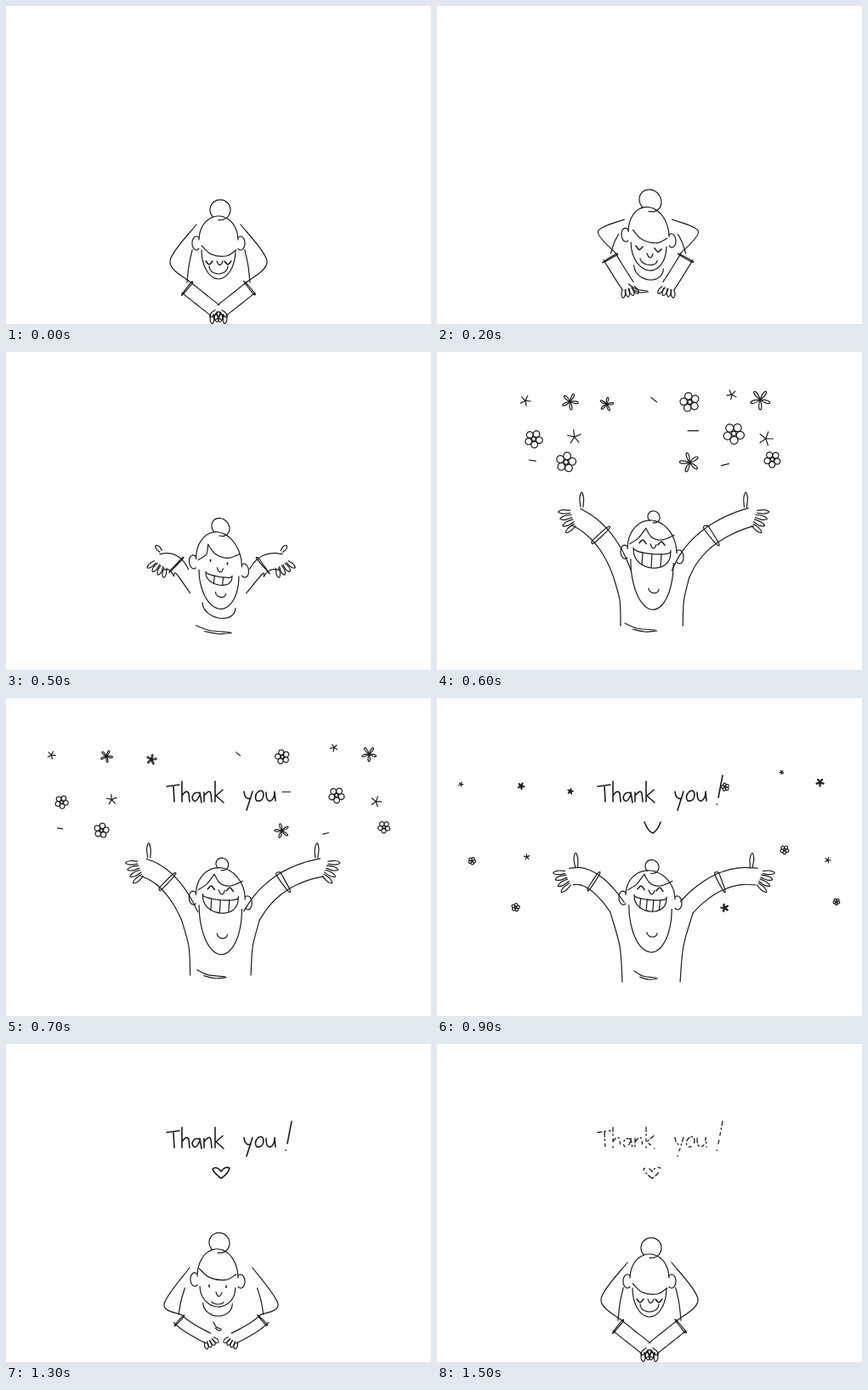
An HTML page for the animation above (1.6 s loop, 500 by 374 pixels).

```html
<!DOCTYPE html>
<html lang="en">
<head>
<meta charset="utf-8">
<title>Thank you!</title>
<style>
  html, body { margin: 0; width: 100%; height: 100%; overflow: hidden; background: #fefefe; }
  #reel { height: 1600vh; animation: roll 1600ms steps(16) infinite; }
  #reel svg { display: block; width: 100vw; height: 100vh; overflow: hidden; }
  path { fill: none; stroke: #1d1d1d; stroke-width: 1.2; stroke-linecap: round; stroke-linejoin: round; }
  .bold { stroke-width: 1.6; }
  .worn { stroke-width: 1.3; stroke-dasharray: 5 3 1.5 4 3 6; }
  @keyframes roll { to { transform: translateY(-100%); } }
</style>
</head>
<body>
<div id="reel" role="img" aria-label="Thank you!"></div>
<script>
const STEPS = 16;

// head: centre, half width, tilt. top, fringe, chin, nose: heights from the centre.
// lid: eye curve, 0 is a dot. smile: half width, height, depth, teeth. hem: x, y, width.
// hand: finger angle and length. arm (left): wrist, elbow, shoulder, two body points.
const bow = {
  head: [250, 279, 23, 0], top: -32, fringe: 15, part: -.85, chin: 42, bun: 12, nose: 24, lid: 1,
  smile: [11, 27, 9, 0], collar: 0, hem: [225, 330, 0], axis: 250, reach: 0,
  half: 8, cuff: .95, hand: [2, 10], swish: 0,
  arm: [[246, 358], [227, 343], [212, 331], [193, 300], [224, 257]]
};
const crouch = {
  head: [248, 266, 25, .25], top: -40, fringe: -5, part: -.7, chin: 35, bun: 14, nose: 19, lid: 1,
  smile: [9, 24, 4, 0], collar: 22, hem: [226, 324, 44], axis: 247, reach: 0,
  half: 8, cuff: .9, hand: [1.7, 9], swish: 1,
  arm: [[203, 300], [197, 276], [194, 258], [186, 230], [217, 245]]
};
const cheer = {
  head: [253, 238, 29, .09], top: -40, fringe: -18, part: -.25, chin: 65, bun: 7, nose: -9, lid: -1,
  smile: [22, -6, 22, 3], collar: 0, hem: [221, 319, 36], axis: 250, reach: .0045,
  half: 11, cuff: .43, hand: [.35, 14], swish: 0,
  arm: [[164, 194], [196, 220], [218, 261], [215, 292], [216, 322]]
};
const beam = {
  ...cheer,
  head: [251, 238, 29, .09], top: -35, chin: 61, bun: 8, smile: [19, -5, 18, 4],
  hem: [232, 321, 26], reach: .004, half: 10, cuff: .5, hand: [.4, 14],
  arm: [[158, 210], [184, 216], [212, 246], [215, 292], [218, 334]]
};
const settle = {
  head: [249, 252, 27, .08], top: -39, fringe: -15, part: -.65, chin: 45, bun: 13, nose: 10, lid: 0,
  smile: [13, 18, 9, 3], collar: 0, hem: [239, 324, 18], axis: 250, reach: .002,
  half: 11, cuff: .5, hand: [1.4, 14], swish: 0,
  arm: [[146, 270], [172, 251], [214, 258], [217, 292], [214, 313]]
};
const lean = {
  head: [249, 278, 24, .04], top: -37, fringe: -1, part: -.9, chin: 31, bun: 12, nose: 17, lid: 0,
  smile: [7, 25, 3, 0], collar: 11, hem: [244, 327, 9], axis: 253, reach: 0,
  half: 6.5, cuff: .9, hand: [2.1, 8], swish: 0,
  arm: [[238, 346], [216, 334], [202, 323], [186, 306], [216, 263]]
};
const keys = [[0, bow], [4, crouch], [6, cheer], [9, beam], [11, settle], [13, lean], [15, bow]];

function mix(a, b, k) {
  if (typeof a === 'number') return a + (b - a) * k;
  if (Array.isArray(a)) return a.map((v, i) => mix(v, b[i], k));
  return Object.fromEntries(Object.keys(a).map(n => [n, mix(a[n], b[n], k)]));
}
function poseAt(t) {
  const i = Math.min(keys.findLastIndex(key => key[0] <= t), keys.length - 2);
  const [[t0, a], [t1, b]] = [keys[i], keys[i + 1]];
  return mix(a, b, (t - t0) / (t1 - t0));
}

// Geometry
const { PI, sin, cos, hypot } = Math;
const fix = n => +n.toFixed(1);
const range = (n, fn) => Array.from({ length: n }, (_, i) => fn(i));
const arc = (x, y, rx, ry, from, to) =>
  range(13, i => mix(from, to, i / 12)).map(a => [x + rx * cos(a), y + ry * sin(a)]);
const path = (d, cls = '') => `<path class="${cls}" d="${d}"/>`;
function spline(pts) {
  let d = `M${pts[0].map(fix)}`;
  for (let i = 0; i < pts.length - 1; i++) {
    const p = pts[i], q = pts[i + 1], o = pts[i - 1] || p, r = pts[i + 2] || q;
    d += `C${[p[0] + (q[0] - o[0]) / 6, p[1] + (q[1] - o[1]) / 6,
              q[0] - (r[0] - p[0]) / 6, q[1] - (r[1] - p[1]) / 6, ...q].map(fix)}`;
  }
  return d;
}
const stroke = (pts, cls) => path(spline(pts), cls);

function drawHead({ head: [x, y, w, tilt], top, fringe, part, chin, bun, nose, lid, smile, collar }) {
  const line = (pts, cls) => stroke(pts.map(([u, v]) => [x + u, y + v + tilt * u]), cls);
  const [m, my, deep, teeth] = smile;
  const eyeY = Math.max(nose - 10, fringe + 6);
  const grin = teeth > .5;
  const lip = (u, depth) => my + depth * Math.max(0, 1 - (u / m) ** 2) ** .4;
  const across = range(13, i => -m * cos(PI * i / 12));

  let out = line(arc(2, top - bun * .6, bun, bun, .75 * PI, 2.55 * PI));
  out += line(arc(0, -4, w, -top - 4, PI, 2 * PI));
  out += line([[part * w, fringe - 12], [mix(part, .35, .4) * w, fringe - 2], [.4 * w, fringe], [.9 * w, fringe - 7]]);
  if (part > -.5) out += line([[part * w, fringe - 12], [-.55 * w, fringe], [-.9 * w, fringe + 8]]);
  out += line(arc(0, 8, .87 * w, chin - 8, PI, 0));
  if (collar > 5) out += line(arc(0, chin - 4, .72 * w, collar + 4, PI, 0));
  for (const s of [-1, 1]) {
    out += line(arc(s * (w + 3), 0, s * 5, 8, -.7 * PI, .7 * PI));
    out += line([[s * 11 - 4, eyeY], [s * 11, eyeY + 4 * lid], [s * 11 + 4, eyeY]]
      .map(([u, v]) => lid ? [u, v] : [s * 10, eyeY + (u - s * 11) / 4]), 'bold');
  }
  out += line([[-2, nose - 3], [0, nose + 1], [3, nose + 1], [5, nose - 3]]);
  if (!grin) return out + line(arc(0, my, m, deep, PI, 0));

  out += line([...across.map(u => [u, lip(u, deep)]), ...across.reverse().map(u => [u, lip(u, deep * .25)])]);
  const n = Math.round(teeth);
  out += range(n, i => m * (2 * (i + 1) / (n + 1) - 1))
    .map(u => line([[u, lip(u, deep * .25)], [u - 1, lip(u, deep)]])).join('');
  return out + line(arc(2, chin * .62, 6, 5, PI, 0));
}

// Quadratic through three points, shifted sideways.
function edge([a, b, c], shift, from = 0, to = 1) {
  return range(7, i => {
    const t = mix(from, to, i / 6);
    const f = [2 * (t - .5) * (t - 1), 4 * t * (1 - t), 2 * t * (t - .5)];
    const g = [4 * t - 3, 4 - 8 * t, 4 * t - 1];
    const dot = (k, j) => k[0] * a[j] + k[1] * b[j] + k[2] * c[j];
    const dx = dot(g, 0), dy = dot(g, 1), len = hypot(dx, dy) || 1;
    return [dot(f, 0) - dy / len * shift, dot(f, 1) + dx / len * shift];
  });
}

function drawHand([x, y], side, [angle, length], half) {
  const dir = a => [side * cos(a), sin(a)];
  const [dx, dy] = dir(angle), [px, py] = dir(angle + PI / 2);
  const finger = (bx, by, a, len) => {
    const [ux, uy] = dir(a), [vx, vy] = dir(a + PI / 2);
    const at = (f, g) => [bx + ux * len * f + vx * g, by + uy * len * f + vy * g];
    return stroke([at(0, -1.5), at(.6, -2.3), at(1, 0), at(.6, 2.3), at(0, 1.5)]);
  };
  const thumb = 12 * (1.8 - angle);
  return range(4, i => {
    const f = (i - 1.5) / 1.5;
    return finger(x + dx * length * .35 + px * f * half * .75, y + dy * length * .35 + py * f * half * .75, angle + f * .35, length);
  }).join('') + (thumb > 3
    ? finger(x - dx * 10 - px * half * .8, y - dy * 10 - py * half * .8, angle - 1.9, thumb) : '');
}

function drawArm({ arm, axis, reach, half, cuff, hand, swish }, side) {
  // The right arm is mirrored, and longer the further it reaches out.
  const pts = side < 0 ? arm : arm.map(([x, y]) => {
    const d = axis - x;
    return [axis + d + reach * d * Math.abs(d), y];
  });
  const [wrist, , shoulder, s1, s2] = pts;
  const limb = pts.slice(0, 3);
  const edges = [half, -half].map(w => edge(limb, w));
  const far = p => hypot(p[0] - s1[0], p[1] - s1[1]);
  const [joint] = edges.map(e => e[6]).sort((p, q) => far(p) - far(q));
  const rim = [[half, -.025], [-half, -.015], [-half, .015], [half, .025]]
    .map(([w, dt]) => edge(limb, w * 1.1, cuff + dt)[0]);

  let out = edges.map(e => stroke(e)).join('') + stroke([joint, s1, s2]);
  out += stroke([...rim, rim[0]]) + drawHand(wrist, side, hand, half);
  if (s2[1] < shoulder[1]) {
    const inner = f => mix(s2, shoulder, f);
    out += stroke([inner(.4), [inner(.65)[0] + side, inner(.65)[1]], inner(.92)]);
  }
  if (swish > .6) {
    out += [17, 23].map(w => stroke(edge(limb, side * w, -.1, .6))).join('');
    out += stroke([[wrist[0] - side * half, wrist[1] + 8], [wrist[0] - side * half, wrist[1] + 33]]);
  }
  return out;
}

function drawFigure(t) {
  const p = poseAt(t), [x, y, w] = p.hem;
  const hem = w > 5
    ? stroke([[x, y], [x + w * .4, y + 6], [x + w, y + 8]]) +
      stroke([[x + w * .25, y + 7], [x + w * .65, y + 10], [x + w * 1.05, y + 9]]) : '';
  return drawArm(p, -1) + drawArm(p, 1) + drawHead(p) + hem;
}

// Lettering, each letter on its own baseline
const letters = {
  T: 'm0-18l15-2m-7 2l1 18', h: 'm1-24v24m0-7q5-8 8-3l1 10', a: 'm9-10q-7-3-9 5q3 10 9-3m0-3l2 12',
  n: 'm1-11v11m0-7q6-8 8-3l1 10', k: 'm1-24v24m9-14l-8 7l9 8', y: 'm0-12q1 10 8 8m2-8l-7 22',
  o: 'm4-12q-6 5-2 11q8 1 8-8q-1-6-6-3', u: 'm0-11q0 11 5 10q5-2 5-11l1 11'
};
const advance = { T: 17, ' ': 22 };
function write(text, x, y) {
  return [...text].map(c => {
    const d = letters[c] ? `M${x} ${y}${letters[c]}` : '';
    x += advance[c] || 13;
    return d;
  }).join('');
}
const bang = 'M336 91l-5 26M329 125h.5';
const smile = 'M244 146q5 12 10 13q6-4 9-13';
const heart = 'M253 158q-9-7-10-11q5-4 10 3q5-7 10-4q-2 7-10 12';

function lettering(t) {
  if (t < 6) return '';
  const words = write('Thank you', 189, 122);
  if (t === 6) return `<g style="clip-path: polygon(207px 107px, 285px 107px, 285px 126px, 207px 126px)">${path(words, 'bold')}</g>`;
  return path(words + (t > 7 ? bang : '') + (t > 9 ? heart : t > 7 ? smile : ''), t === 15 ? 'worn' : 'bold');
}

// Confetti: jittered rows that leave room for the words
let seed = 11;
const random = () => (seed = seed * 16807 % 2147483647) / 2147483647;
const kinds = ['star', 'petal', 'round', 'petal', 'dash'];
const pieces = range(21, i => {
  const row = Math.floor(i / 7), col = i % 7;
  return {
    x: 112 + col * 46 + (random() - .5) * 16, y: 58 + row * 37 + (random() - .5) * 16,
    kind: kinds[(i * 3 + row) % 5], size: 8 + 5 * random(), tilt: random() * 3, life: 3 + 6 * random() ** 3
  };
}).filter(p => p.y < 85 || p.x < 192 || p.x > 290);

const ray = (x, y, r, a) => [fix(x + r * cos(a)), fix(y + r * sin(a))];
const ring = (x, y, r) => spline(arc(x, y, r, r, 0, 2 * PI));
const five = (tilt, draw) => range(5, i => draw(tilt + i * PI * .4)).join('');
const shapes = {
  dash: (x, y, r, a) => `M${ray(x, y, r * .5, a)}L${ray(x, y, r * -.5, a)}`,
  star: (x, y, r, tilt) => five(tilt, a => `M${fix(x)},${fix(y)}L${ray(x, y, r * .65, a)}`),
  petal: (x, y, r, tilt) => five(tilt, a =>
    `M${fix(x)},${fix(y)}C${ray(x, y, r * 1.35, a - .35)} ${ray(x, y, r * 1.35, a + .35)} ${fix(x)},${fix(y)}`),
  round: (x, y, r, tilt) => ring(x, y, r * .24) + five(tilt, a => ring(...ray(x, y, r * .7, a), r * .4))
};

// Pieces burst outwards, fall and shrink.
function confetti(t) {
  const k = t - 6;
  if (k < 0) return '';
  return pieces.filter(p => k <= p.life && (p.kind !== 'dash' || k < 2)).map(p => {
    const d = p.x - 250, out = 1.05 * (1 - Math.exp(-k));
    const x = p.x + (d * .35 + Math.sign(d) * 25) * out;
    const y = p.y + (p.y - 13) * (k / 3) ** 1.36;
    const r = p.size * Math.exp(-.3 * k);
    return r < 2.5 ? path(ring(x, y, .4), 'bold') : path(shapes[p.kind](x, y, r, p.tilt));
  }).join('');
}

document.getElementById('reel').innerHTML = range(STEPS, t =>
  `<svg viewBox="0 0 500 374">${drawFigure(t)}${lettering(t)}${confetti(t)}</svg>`).join('');
</script>
</body>
</html>
```
